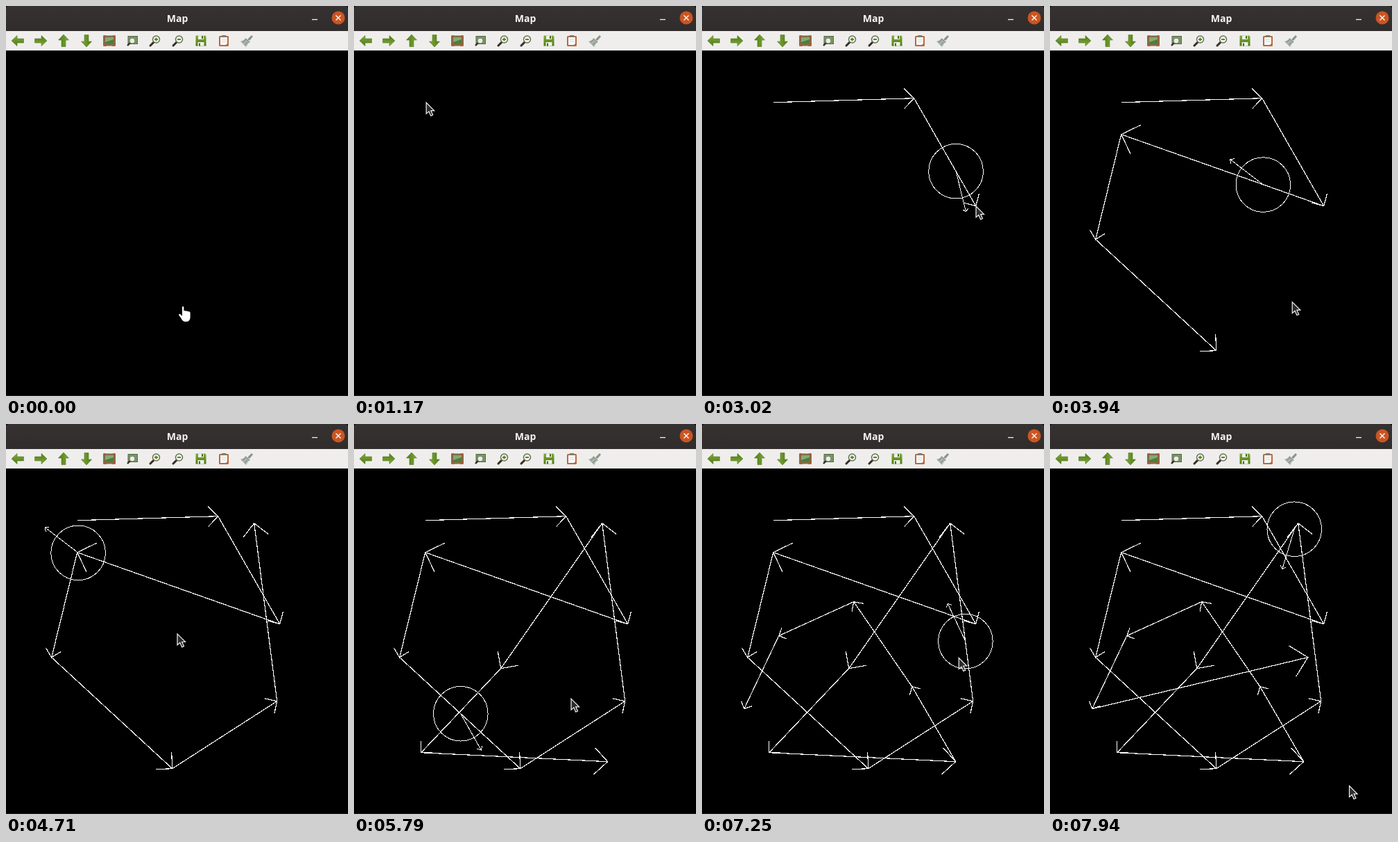
Recreate the animation shown at these times as an HTML page. Size 493 by 561 pixels, loop 8000 ms.

```html
<!DOCTYPE html>
<html lang="en">
<head>
<meta charset="utf-8">
<title>Map</title>
<style>
html, body { margin: 0; width: 100%; height: 100%; overflow: hidden; background: #000; }
svg { display: block; width: 493px; height: 561px; }
.title { font: bold 14px "Open Sans", "Noto Sans", sans-serif; fill: #f6f5f4; text-anchor: middle; }
.plot { fill: none; stroke: #fff; stroke-width: 1.2; shape-rendering: crispEdges; }
#robot .plot { stroke-width: 1; }
</style>
</head>
<body>
<svg viewBox="0 0 493 561">
  <defs>
    <linearGradient id="bar" x2="0" y2="1"><stop stop-color="#363232"/><stop offset="1" stop-color="#302c2c"/></linearGradient>
    <linearGradient id="green" x2="0" y2="1"><stop stop-color="#84a83c"/><stop offset="1" stop-color="#4c7d12"/></linearGradient>
    <path id="arrow" d="M-9 0 L-1 -7.5 V-3 H8.5 V3 H-1 V7.5Z" fill="url(#green)" stroke="#557d24" stroke-width=".6"/>
    <g id="lens">
      <path d="M-2 2 L-7 7" stroke="#3a2c1c" stroke-width="3" stroke-linecap="round"/>
      <circle cx="1.5" cy="-2" r="5" fill="#f3f6ec" stroke="#66705c" stroke-width="1.5"/>
    </g>
  </defs>

  <rect width="493" height="561"/>
  <rect y="560" width="493" height="1" fill="#1c1c1c"/>
  <path d="M0 36 V4 Q0 0 4 0 H489 Q493 0 493 4 V36Z" fill="url(#bar)"/>
  <text class="title" x="247" y="23">Map</text>
  <path d="M441 19.5 H449" stroke="#f0f0f0" stroke-width="1.3"/>
  <circle cx="479" cy="17" r="9.5" fill="#cb5522"/>
  <path d="M475.5 13.5 l7 7 m0 -7 l-7 7" stroke="#fff" stroke-width="1.4"/>

  <rect y="36" width="493" height="28" fill="#efeeed"/>
  <use href="#arrow" x="17" y="50"/>
  <use href="#arrow" transform="translate(50 50) rotate(180)"/>
  <use href="#arrow" transform="translate(83 50) rotate(90)"/>
  <use href="#arrow" transform="translate(116 50) rotate(-90)"/>
  <g transform="translate(149 50)">
    <rect x="-9" y="-7.5" width="18" height="15" rx="2" fill="#8b6a48"/>
    <rect x="-6.5" y="-5.5" width="13" height="10" fill="#4f7d36"/>
    <path d="M-6 -5 H6 V-2 L-6 2Z" fill="#86a878"/>
    <path d="M-8 -3 V-7 H-5 M5 -7 H8 V-3 M8 3 V7 H4 M-4 7 H-8 V3" fill="none" stroke="#b9512c" stroke-width="1.5"/>
  </g>
  <g transform="translate(182 50)">
    <rect x="-6" y="-6.5" width="13.5" height="11" fill="#78975c" stroke="#59684e"/>
    <path d="M-3 3 L-7 7" stroke="#3a2c1c" stroke-width="2.4"/>
    <circle r="4" fill="#e7efe2" stroke="#707a69"/>
  </g>
  <use href="#lens" x="215" y="50"/>
  <use href="#lens" x="248" y="50"/>
  <path d="M214 48 h5 m-2.5 -2.5 v5 M247 48 h5" stroke="#568915" stroke-width="1.8"/>
  <g transform="translate(281 50)">
    <path d="M-7.5 -7.5 H6 L7.5 -6 V7.5 H-7.5Z" fill="url(#green)"/>
    <path d="M-4 -7.5 H4 V-2 H-4Z M-4.5 2 H4.5 V7.5 H-4.5Z" fill="#eef2e8"/>
    <path d="M1 -7 h2 v4 h-2z M-3 3.5 h2 v4 h-2z" fill="#426d17"/>
  </g>
  <g transform="translate(314 50)">
    <rect x="-7" y="-7" width="14" height="15" rx="1.5" fill="#b66a40"/>
    <path d="M-5 -5 H5 V4 L3 6 H-5Z" fill="#f8f8f8"/>
    <path d="M-3 -8 H3 V-5 H-3Z" fill="#77806d"/>
    <path d="M-3 -2 H3 M-3 1 H3" stroke="#d8d8d8"/>
  </g>
  <g transform="translate(347 50)">
    <path d="M7 -8 L9 -6 L4 0 L1 -2Z" fill="#8d948b"/>
    <path d="M-2 -4 L5 2 L2 4 L-1 9 L-9 1 L-4 -1Z" fill="#a9b3a9"/>
    <path d="M-2 -3 L4 2 M-6 2 L-2 -1 M-3 6 L1 2" stroke="#75806f"/>
  </g>

  <path id="route" class="plot" transform="translate(-.3 -.3)"/>
  <g id="robot"><circle class="plot" r="39.3"/><path id="heading" class="plot"/></g>
  <path id="pointer" d="M0 0 V16 L3.8 12.7 L6.6 19 L9.5 17.8 L6.7 11.6 H11.5Z" fill="#2d2d2d" stroke="#f4f4f4" stroke-width="1.2"/>
  <path id="hand" fill="#fff" d="M-1 1 Q0 -1 1.3 1 V7 Q2.6 5 4 7 Q5.8 5.6 7 7.6 Q9.3 6.4 10.6 9 V16 Q10 22 5 22 H2 Q-1 21 -3 16.5 L-6 12.5 Q-5.5 10 -3 12 L-1 14Z"/>
</svg>
<script>
const LOOP = 8000, START = 1640, STEP = 76.83;
const ROBOT_SPEED = 0.2805; // px per ms
const $ = id => document.getElementById(id);
const clamp = (v, lo, hi) => Math.min(hi, Math.max(lo, v));
const ramp = (t, from, to) => clamp((t - from) / (to - from), 0, 1);
const mix = (a, b, u) => a.map((v, i) => v + (b[i] - v) * u);

const points = [
  [103, 139], [306, 133], [395, 288], [103, 185], [66, 336], [240, 496], [391, 399], [358, 143],
  [212, 352], [97, 473], [366, 486], [303, 378], [219, 256], [111, 305], [61, 410], [372, 336]
];

let total = 0;
const legs = points.slice(1).map((to, i) => {
  const from = points[i], dx = to[0] - from[0], dy = to[1] - from[1];
  const length = Math.hypot(dx, dy);
  const angle = Math.atan2(dy, dx) * 180 / Math.PI;
  // The robot's compass drifts slowly from leg to leg
  const drift = clamp(36 * Math.sin(Math.PI * (i - 0.35) / 4.45), -18, 18);
  total += length;
  return { from, to, length, angle, heading: angle + drift, end: total };
});

// Distance sketched along the route: two single strokes, then a long one that tires
const sketched = t => legs[0].length * ramp(t, 1100, 1480)
  + legs[1].length * ramp(t, 2200, 2475)
  + 6.07 * Math.max(0, t - 3100) ** 0.73;

function pointerAt(t) {
  if (t < 1100) return mix([255, 432], [104, 140], ramp(t, 26, 410));
  const distance = sketched(t);
  const leg = legs.find(l => distance < l.end);
  if (leg) return mix(leg.to, leg.from, (leg.end - distance) / leg.length);
  return mix(points[points.length - 1], [431.5, 520.5], ramp(t, 7480, 7935));
}

// Drive each leg at constant speed, then turn clockwise on the spot
function robotAt(t) {
  let left = t - START;
  for (const [i, leg] of legs.entries()) {
    const drive = leg.length / ROBOT_SPEED;
    if (left < drive) return [...mix(leg.from, leg.to, left / drive), leg.heading];
    left -= drive;
    const next = legs[i + 1];
    const bend = (next.angle - leg.angle + 360) % 360;
    const pause = bend < 180 ? 105 + 2 * bend : 46;
    const turn = (next.heading - leg.heading + 720) % 360;
    if (left < pause) return [...leg.to, leg.heading + turn * left / pause];
    left -= pause;
  }
}

// Arrow with two 45 degree barbs, a tenth of its length each
function arrow([x1, y1], [x2, y2]) {
  const angle = Math.atan2(y2 - y1, x2 - x1);
  const size = Math.hypot(x2 - x1, y2 - y1) / 10;
  const barb = side => {
    const a = angle + side * Math.PI / 4;
    return `${x2 - size * Math.cos(a)} ${y2 - size * Math.sin(a)}`;
  };
  return `M${x1} ${y1}L${x2} ${y2}M${barb(1)}L${x2} ${y2}L${barb(-1)}`;
}

const moveTo = (id, x, y) => $(id).setAttribute("transform", `translate(${x} ${y})`);
const show = (id, on) => $(id).setAttribute("visibility", on ? "visible" : "hidden");

function draw(t) {
  const step = Math.floor((t - START + 6) / STEP);
  const time = START + step * STEP;
  const started = step >= 0;

  const distance = started ? sketched(time) + 0.01 : 0;
  $("route").setAttribute("d", legs.filter(l => l.end <= distance).map(l => arrow(l.from, l.to)).join(""));

  show("robot", started);
  if (started) {
    const [x, y, heading] = robotAt(time);
    const angle = heading * Math.PI / 180;
    moveTo("robot", x, y);
    $("heading").setAttribute("d", arrow([0, 0], [60 * Math.cos(angle), 60 * Math.sin(angle)]));
  }

  const isHand = t < 620;
  show("hand", isHand);
  show("pointer", !isHand);
  moveTo(isHand ? "hand" : "pointer", ...pointerAt(time));
}

function tick() {
  draw(performance.now() % LOOP);
  requestAnimationFrame(tick);
}
tick();
</script>
</body>
</html>
```
